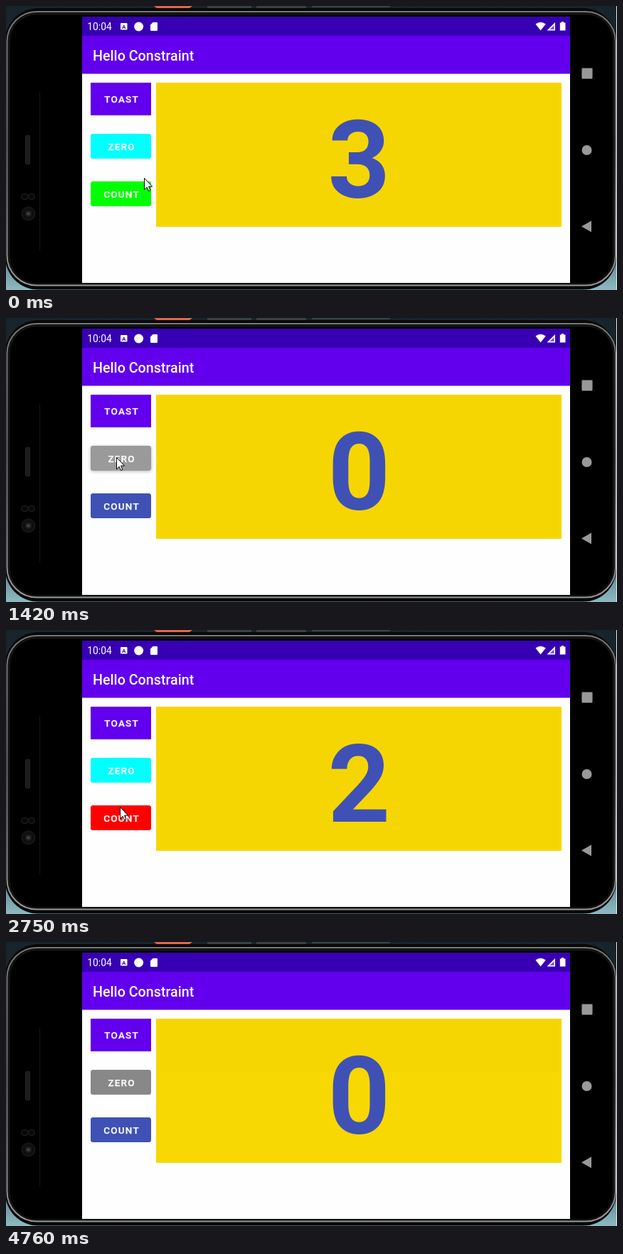
Write an HTML page that moves like this. It is 859 px wide and 400 px high and loops after 5440 ms.

```html
<!DOCTYPE html>
<html lang="en">
<head>
<meta charset="utf-8">
<title>Counter app</title>
<style>
  html, body { margin: 0; width: 100%; height: 100%; overflow: hidden; background: #000; }
  svg { display: block; width: 100%; height: 100%; font-family: Roboto, "Open Sans", sans-serif; }
  .label {
    font-size: 13.5px; font-weight: 500; letter-spacing: 1.2px; text-anchor: middle;
    fill: #fff; stroke: #fff; stroke-width: .25px;
  }
</style>
</head>
<body>
<svg viewBox="0 0 859 400">
  <defs>
    <linearGradient id="desk" x1="0" y1="0" x2="0" y2="1">
      <stop offset="0" stop-color="#17242b"/>
      <stop offset=".85" stop-color="#26343a"/>
      <stop offset=".93" stop-color="#6f9aa4"/>
      <stop offset="1" stop-color="#8fb9c0"/>
    </linearGradient>
    <linearGradient id="rim" x1="0" y1="0" x2="0" y2="1">
      <stop offset="0" stop-color="#777"/>
      <stop offset=".5" stop-color="#6a6a6a"/>
      <stop offset="1" stop-color="#999"/>
    </linearGradient>
    <radialGradient id="lens">
      <stop offset="0" stop-color="#4a4d55"/>
      <stop offset=".3" stop-color="#202227"/>
      <stop offset=".6" stop-color="#0b0b0c"/>
      <stop offset="1" stop-color="#1a1a1b"/>
    </radialGradient>
  </defs>

  <!-- desktop behind the phone -->
  <rect width="859" height="400" fill="url(#desk)"/>
  <path d="M208 0h54l-4 3h-46z" fill="#e0694c"/>
  <path d="M283 0h62v3h-62zM352 0h70v3h-70zM430 0h110v2h-110z" fill="#3b4145"/>

  <!-- phone body -->
  <rect x="-1" y="3" width="859" height="396.500" rx="46" fill="#080808"/>
  <rect x="1.500" y="8" width="855.500" height="385.500" rx="42" fill="#101010" stroke="url(#rim)" stroke-width="2"/>
  <rect x="5" y="11.500" width="848.500" height="379.500" rx="38" fill="#000" stroke="#1c1c1c"/>
  <rect x="858" width="1" height="400" fill="#e8e8e8"/>
  <path d="M47.500 122V345" stroke="#161616"/>
  <rect x="27.500" y="182.500" width="6" height="40" rx="1.500" fill="#1c1c1c" stroke="#282828"/>
  <g fill="#080808" stroke="#242424">
    <rect x="21.500" y="264.500" width="10" height="8" rx="4"/>
    <rect x="31.500" y="264.500" width="9" height="8" rx="4"/>
  </g>
  <circle cx="31.500" cy="292.500" r="10" fill="url(#lens)"/>

  <g fill="#999">
    <rect x="809.500" y="87.500" width="15" height="15" rx="1"/>
    <circle cx="816.500" cy="203" r="7"/>
    <path d="M809 310.500L823 302.500V318.500Z"/>
  </g>

  <!-- screen -->
  <rect x="107" y="15" width="686" height="375" fill="#fefefe"/>
  <rect x="107" y="15" width="686" height="27" fill="#3700b3"/>
  <rect x="107" y="42" width="686" height="53.500" fill="#6200ee"/>
  <g fill="#fff">
    <text x="114.300" y="34" font-size="13.800">10:04</text>
    <rect x="161" y="24" width="9.500" height="9.500" rx="1"/>
    <circle cx="186.600" cy="29" r="6.500"/>
    <path d="M206.500 23H212Q213 23 213 24V34Q213 35 212 35H204Q203 35 203 34V26.500Z"/>
    <path d="M744.500 25.500Q751.500 20 758.800 25.500L751.600 34.500Z"/>
    <path d="M772 23V34.500H760.500Z"/>
    <path d="M781 22H784V23.500H786.500V34.500H778.800V23.500H781Z"/>
    <text x="122" y="77" font-size="19.700" font-weight="500">Hello Constraint</text>
  </g>
  <path d="M770.500 27V33H764.500Z" fill="#3700b3" opacity=".65"/>
  <text x="165.750" y="31.600" font-size="8" font-weight="700" text-anchor="middle" fill="#3700b3">A</text>

  <rect x="119" y="108" width="85" height="46" fill="#6200ee"/>
  <text class="label" x="162.600" y="136.300">TOAST</text>
  <g id="buttons"></g>

  <rect x="211" y="108" width="570" height="203" fill="#f6d602"/>
  <rect id="glow" x="211" y="183" width="570" height="128" fill="#f8d802"/>
  <text id="digit" x="496.300" y="269.800" font-size="153" font-weight="700" text-anchor="middle" fill="#3f51b5"></text>

  <path id="cursor" d="M.5.5V16.800L4.200 13.300L6.600 18.700L8.900 17.700L6.600 12.200H11.600Z"
        fill="#fff" stroke="#000" stroke-linejoin="round"/>
</svg>
<script>
const LOOP = 5440;
const NS = "http://www.w3.org/2000/svg";
const $ = id => document.getElementById(id);

// time, pointer x, pointer y
const moves = [
  [0, 194, 242], [150, 218, 252], [270, 248, 256], [390, 272, 257],
  [540, 322, 222], [690, 247, 196], [850, 185, 196], [990, 155, 196],
  [1660, 157, 215], [1780, 159, 239], [1940, 159, 249], [2080, 159, 251],
  [2750, 160, 249], [2870, 170, 226], [2990, 176, 208], [3140, 179, 198],
  [4090, 300, 244], [4210, 440, 297], [4330, 562, 342], [4640, 665, 383],
  [4760, 900, 450]
];

// time, count, held button, elevation, ripple
const states = [
  [0, 3, "", 0, 0],
  [1270, 3, "ZERO", 1, .4], [1420, 0, "ZERO", .6, .15], [1540, 0, "", 0, 0],
  [2330, 1, "COUNT", 1, .15], [2490, 1, "COUNT", 1, .38],
  [2630, 2, "COUNT", .6, .15], [2750, 2, "", 0, 0],
  [3820, 2, "ZERO", .35, 0], [3940, 0, "ZERO", .6, .15], [4090, 0, "", 0, 0]
];

function add(parent, tag, attrs) {
  const node = document.createElementNS(NS, tag);
  for (const key in attrs) node.setAttribute(key, attrs[key]);
  return parent.appendChild(node);
}

function makeButton(name, y) {
  const box = { x: 119, y, width: 85, height: 35, rx: 3.5 };
  const face = add($("buttons"), "rect", box);
  const ripple = add($("buttons"), "rect", { ...box, fill: "#fff" });
  add($("buttons"), "text", { class: "label", x: 162.6, y: y + 22.8 }).textContent = name;
  return (color, lift, glow) => {
    face.setAttribute("fill", color);
    face.style.filter = `drop-shadow(0 ${.5 + lift}px ${.6 + 2.2 * lift}px rgba(0,0,0,${.22 + .13 * lift}))`;
    ripple.setAttribute("opacity", glow);
  };
}

const drawZero = makeButton("ZERO", 180);
const drawCount = makeButton("COUNT", 247);
const latest = (list, t) => list.findLast(row => row[0] <= t);

function render(t) {
  const [, x, y] = latest(moves, t);
  const [, count, held, lift, ripple] = latest(states, t);
  const press = name => held === name ? [lift, ripple] : [0, 0];
  drawZero(count ? "#00ffff" : "#888888", ...press("ZERO"));
  drawCount(!count ? "#3f51b5" : count % 2 ? "#00ff00" : "#ff0000", ...press("COUNT"));
  $("digit").textContent = count;
  $("glow").setAttribute("opacity", t >= 4090 ? 1 : 0);
  $("cursor").setAttribute("transform", `translate(${x} ${y})`);
}

const start = performance.now();
function tick() {
  render((performance.now() - start) % LOOP);
  requestAnimationFrame(tick);
}
tick();
</script>
</body>
</html>
```
